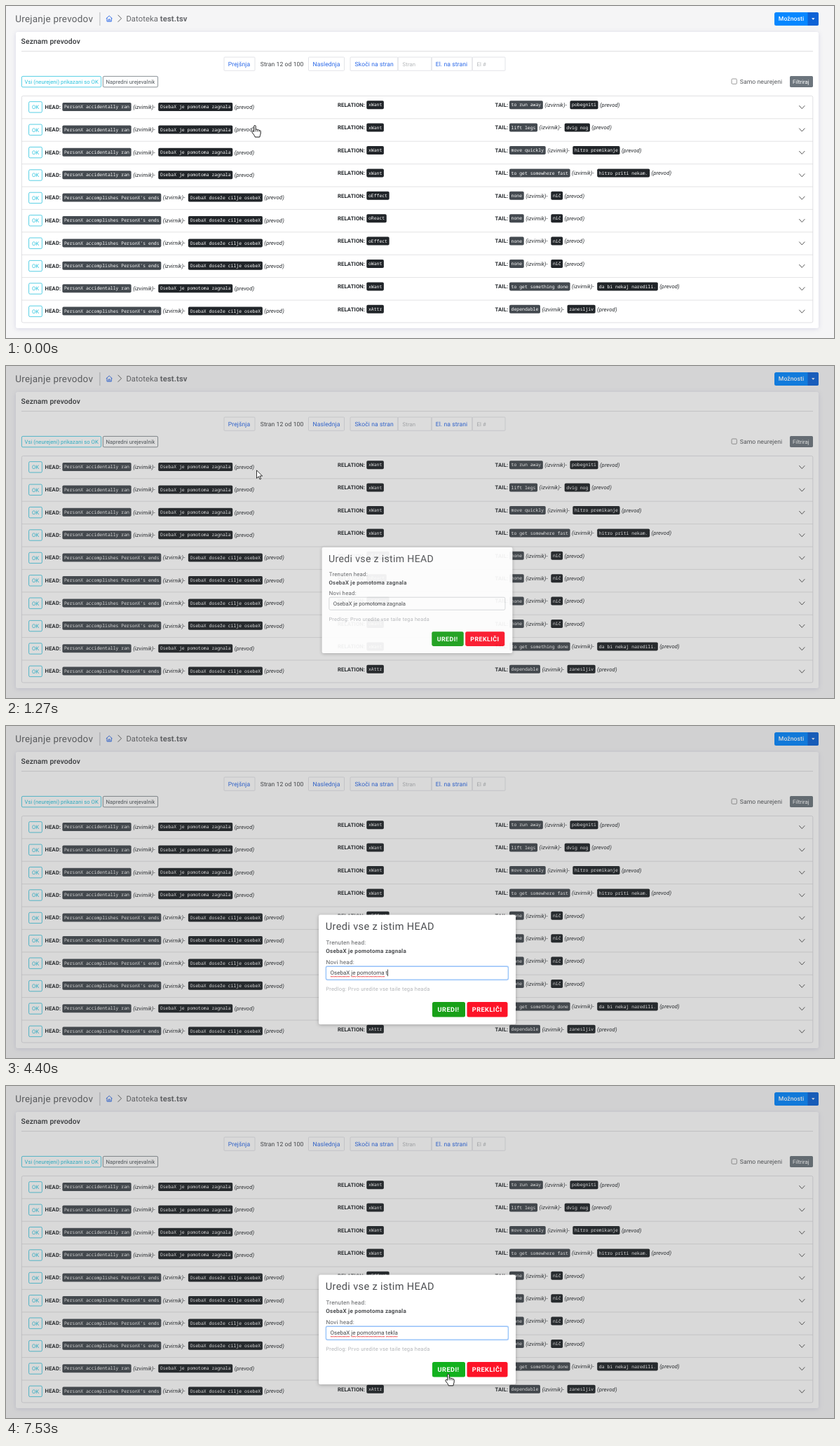
Write an HTML page that moves like this. It is 1181 px wide and 474 px high and loops after 8 s.

```html
<!DOCTYPE html>
<html lang="sl">
<head>
<meta charset="utf-8">
<title>Urejanje prevodov</title>
<style>
  html, body { margin: 0; width: 100%; height: 100%; overflow: hidden; background: #f5f5f6; }
  svg { display: block; width: 1181px; height: 474px; }
  text { font-family: Roboto, sans-serif; white-space: pre; text-rendering: geometricPrecision; }
  .code { font: 500 6.46px "Noto Sans Mono", monospace; fill: #fff; }
  .card { filter: drop-shadow(0 1px 3px rgba(60, 65, 150, .16)); }
  .box { filter: drop-shadow(0 1px 2.5px rgba(0, 0, 0, .25)); }
</style>
</head>
<body>
<svg id="stage" viewBox="0 0 1181 474"></svg>
<script>
const LOOP = 8000, CHAR = 3.877;
const BLUE = '#2a68e8', CYAN = '#2cc3dd', INK = '#24282c', GREY = '#6c757d';

const text = (x, y, s, size, fill, { w = 400, ls = .08, id = '' } = {}) =>
  `<text id="${id}" x="${x}" y="${y}" font-size="${size}" font-weight="${w}" letter-spacing="${ls}" fill="${fill}">${s}</text>`;
const rect = (x, y, w, h, fill, r = 0, extra = '') =>
  `<rect x="${x}" y="${y}" width="${w}" height="${h}" rx="${r}" fill="${fill}" ${extra}/>`;
const frame = (x, y, w, h, color, r = 1.7) =>
  rect(x, y, w, h, 'none', r, `stroke="${color}" stroke-width=".8"`);
const line = (d, color, width = .8) =>
  `<path d="${d}" fill="none" stroke="${color}" stroke-width="${width}"/>`;

const codeWidth = s => s.length * CHAR + 5.2;
const code = (x, y, s, fill) =>
  rect(x, y - 6, codeWidth(s), 12, fill, 1.8) + `<text class="code" x="${x + 2.6}" y="${y + 2.1}">${s}</text>`;

// A label followed by the English chip and its translation
function pair(x, y, from, to) {
  const a = x + codeWidth(from), b = a + 38.6;
  return code(x, y, from, '#444a50') +
    text(a + 2.5, y + 2.8, '<tspan font-style="italic">(izvirnik)</tspan>-', 7.75, INK) +
    code(b, y, to, '#212529') +
    text(b + codeWidth(to) + 2.4, y + 2.8, '<tspan font-style="italic">(prevod)</tspan>', 7.75, INK);
}

const RAN = ['PersonX accidentally ran', 'OsebaX je pomotoma zagnala'];
const ENDS = ["PersonX accomplishes PersonX's ends", 'OsebaX doseže cilje osebeX'];
const rows = [
  [RAN, 'xWant', 'to run away', 'pobegniti'],
  [RAN, 'xWant', 'lift legs', 'dvig nog'],
  [RAN, 'xWant', 'move quickly', 'hitro premikanje'],
  [RAN, 'xWant', 'to get somewhere fast', 'hitro priti nekam.'],
  [ENDS, 'oEffect', 'none', 'nič'],
  [ENDS, 'oReact', 'none', 'nič'],
  [ENDS, 'oEffect', 'none', 'nič'],
  [ENDS, 'oWant', 'none', 'nič'],
  [RAN, 'xWant', 'to get something done', 'da bi nekaj naredili.'],
  [ENDS, 'xAttr', 'dependable', 'zanesljiv'],
];

function row([head, relation, tail, tailTo], i) {
  const y = 144 + i * 32.4, up = y - 2.8, bold = { w: 700 };
  return (i ? line(`M22 ${y - 15.6}H1151`, '#dcdcde') : '') +
    frame(32.6, y - 7.4, 18.8, 15.4, CYAN) + text(37, y + 3.2, 'OK', 7.75, CYAN, { ls: 0 }) +
    text(55.6, y + 2.8, 'HEAD:', 7.75, INK, bold) + pair(80.4, y, ...head) +
    text(473, up + 2.8, 'RELATION:', 7.75, INK, bold) + code(514.3, up, relation, '#212529') +
    text(697.6, up + 2.8, 'TAIL:', 7.75, INK, bold) + pair(718, up, tail, tailTo) +
    line(`M1131.3 ${y - 1.8}l4 4.4l4-4.4`, '#444', .9);
}

const header =
  text(13.3, 23, 'Urejanje prevodov', 13.5, '#5e6063', { ls: .22 }) +
  line('M133.9 9V28', '#a9abb0') +
  line('M142.8 18L147.2 14L151.6 18M144 17V22H150.4V17M146.1 22V19H148.3V22', BLUE, .9) +
  line('M159.6 12.8L164.6 17.8L159.6 22.8', '#626262', 1) +
  text(171.4, 21.6, 'Datoteka <tspan font-weight="700">test.tsv</tspan>', 11.25, '#66686c') +
  rect(1096, 9, 63, 19, '#0587ff', 2.5) +
  '<path d="M1143.5 9H1156.5Q1159 9 1159 11.5V25.5Q1159 28 1156.5 28H1143.5Z" fill="#0d63d6"/>' +
  text(1101.8, 21.3, 'Možnosti', 8.61, '#fff', { w: 500 }) +
  '<path d="M1149 17.2H1153.6L1151.3 19.8Z" fill="#fff"/>';

const tools =
  rect(14, 37, 1145, 423, '#fff', 2.5, 'class="card"') +
  text(21.6, 53.8, 'Seznam prevodov', 10.4, '#333639', { w: 500, ls: .1 }) +
  line('M22 64.6H1151', '#d4d4d6') +
  [[311, 44], [431.5, 51], [491, 68], [559, 48], [607, 58], [665, 47]]
    .map(([x, w]) => frame(x, 73, w, 19.3, '#dcdee2', 1)).join('') +
  [[316.8, 'Prejšnja'], [437.5, 'Naslednja'], [497.6, 'Skoči na stran'], [612.7, 'El. na strani']]
    .map(([x, s]) => text(x, 86, s, 8.61, BLUE)).join('') +
  text(362.8, 86, 'Stran 12 od 100', 8.61, '#414448') +
  text(565.6, 85.7, 'Stran', 7.75, '#b4b7ba') + text(671.6, 85.7, 'El #', 7.75, '#b4b7ba') +
  frame(22.4, 100.4, 113.2, 15.4, CYAN) +
  text(26.6, 110.6, 'Vsi (neurejeni) prikazani so OK', 7.75, CYAN, { ls: 0 }) +
  frame(138.4, 100.4, 78.2, 15.4, GREY) +
  text(142.6, 110.6, 'Napredni urejevalnik', 7.75, '#50575d', { ls: 0 }) +
  frame(1035, 104, 7.3, 7.3, '#858585', 1.3) +
  text(1046.8, 110.8, 'Samo neurejeni', 8.61, '#54575b') +
  rect(1118, 100, 33, 16, GREY, 1.7) + text(1122, 110.6, 'Filtriraj', 7.75, '#fff', { ls: 0 }) +
  frame(22.4, 128.4, 1128.4, 323.6, '#d8d9dc', 2);

const dialog =
  rect(446, 269.5, 281, 156.5, '#fff', 2.5, 'class="box"') +
  text(455.8, 291.4, 'Uredi vse z istim HEAD', 14.6, '#4d4f52', { ls: .33 }) +
  text(456.5, 312, 'Trenuten head:', 8.1, '#5c5e61', { ls: .25 }) +
  text(456.2, 324.4, RAN[1], 8.1, '#4c4e51', { w: 700, ls: .25 }) +
  text(456.5, 340, 'Novi head:', 8.1, '#5c5e61', { ls: .25 }) +
  rect(455.6, 342.2, 261.6, 21, '#b5d4fb', 2.4, 'id="glow"') +
  rect(456.6, 343.4, 259.6, 18.6, '#fff', 2, 'id="field" stroke-width=".8"') +
  rect(541.4, 346.8, 28.2, 11.4, '#2b7cd3', 0, 'id="mark"') +
  text(462.6, 355.2, '', 8, '#444649', { ls: 0, id: 'value' }) +
  '<path id="wave" fill="none" stroke="#ee3038" stroke-width=".9"/>' +
  rect(558.8, 347.6, .8, 9.6, '#222', 0, 'id="caret"') +
  text(456.2, 378, 'Predlog: Prvo uredite vse taile tega heada', 7.5, '#b3b5b8', { ls: .25 }) +
  rect(608, 394, 47, 21.5, '#18a018', 2.5, 'id="ok"') +
  text(615.6, 408, 'UREDI!', 9.2, '#fff', { w: 700, ls: .45 }) +
  rect(657.5, 394, 58, 21.5, '#fd1327', 2.5) +
  text(664.8, 408, 'PREKLIČI', 9.2, '#fff', { w: 700, ls: .45 });

const pointers =
  '<g id="arrow"><path d="M0 0V11.4L2.7 8.9L4.6 13L6.2 12.2L4.4 8.2H8.1Z" fill="#fff" stroke="#000" stroke-width=".8"/></g>' +
  '<g id="hand"><path d="M-1.3 9V1C-1.3-.3 1.2-.3 1.2 1V6C2 5.3 3.6 5.4 3.7 6.5C4.6 5.9 6 6.2 6.1 7.2C7 6.8 8.2 7.2 8.2 8.3V11.5C8.2 13.5 7 14.5 6.8 16.6H.2C0 14.5-2.5 12.5-4 9.8C-4.6 8.6-3 7.6-2.2 8.3Z" fill="#fff" stroke="#000" stroke-width=".9"/><path d="M1.2 6V9M3.7 6.6V9M6.1 7.3V9.2" stroke="#000" stroke-width=".7"/></g>' +
  '<g id="beam"><path d="M-2.2-5.6H-.8L0-5L.8-5.6H2.2M0-5V5M-2.2 5.6H-.8L0 5L.8 5.6H2.2" fill="none" stroke-width=".9"/></g>';

document.getElementById('stage').innerHTML =
  rect(0, 0, 1181, 474, '#f5f5f6') + header + tools + rows.map(row).join('') +
  rect(0, 0, 1181, 474, '#444', 0, 'id="shade"') + `<g id="dialog">${dialog}</g>` + pointers;

const $ = id => document.getElementById(id);
const set = (id, name, v) => $(id).setAttribute(name, v);
const show = (id, on) => set(id, 'visibility', on ? 'visible' : 'hidden');

// cubic-bezier(.36, .55, .19, 1)
function ease(x) {
  const at = (s, a, b) => 3 * (1 - s) ** 2 * s * a + 3 * (1 - s) * s * s * b + s ** 3;
  let lo = 0, hi = 1;
  for (let i = 0; i < 20; i++) {
    const mid = (lo + hi) / 2;
    if (at(mid, .36, .19) < x) lo = mid; else hi = mid;
  }
  return at(lo, .55, 1);
}

// Pointer stops: time, x, y
const path = [
  [0, 355, 170.5], [35, 355, 170.5], [270, 348.5, 144], [930, 348.5, 144], [1130, 348.5, 143.2],
  [1270, 357, 148.4], [1730, 592.5, 366.4], [2130, 543, 352.2], [5420, 543, 352.2], [5530, 531.8, 352.5],
  [5700, 531.8, 352.5], [6530, 581, 369.5], [6600, 583, 371], [7000, 631.6, 411.2],
  [7240, 631.6, 411.2], [7270, 631, 411.2], [LOOP, 631, 411.2],
];
function pointerAt(t) {
  const i = path.findIndex(p => p[0] > t), [t0, x0, y0] = path[i - 1], [t1, x1, y1] = path[i];
  const k = (t - t0) / (t1 - t0);
  return [x0 + (x1 - x0) * k, y0 + (y1 - y0) * k];
}

const keys = [4400, 4470, 4600, 4800, 4870];
const stem = 'OsebaX je pomotoma ';
const wordEnds = [[462.8, 490.2], [492.4, 498.6], [500.6, 539.6]];
const wave = ([a, b]) => {
  let d = `M${a} 357.4`;
  for (let x = a, k = 1; x < b; x += 1.2, k = -k) d += `l1.2 ${.8 * k}`;
  return d;
};

function draw(t) {
  const p = ease(Math.min(1, Math.max(0, (t - 1015) / 440))), rest = 1 - p;
  set('shade', 'opacity', .2 * p);
  set('dialog', 'opacity', p);
  set('dialog', 'transform', `translate(586.5 ${347.7 - 203 * rest}) scale(${1 - .5 * rest}) translate(-586.5 -347.7)`);

  const focus = t >= 2200, marked = t >= 2470 && t < 4400, typed = keys.filter(k => k <= t).length;
  set('glow', 'opacity', focus ? Math.min(1, (t - 2130) / 200) : 0);
  set('field', 'stroke', focus ? '#80b7f8' : '#c9cbce');
  set('mark', 'opacity', marked ? 1 : 0);
  const last = typed ? 'tekla'.slice(0, typed) : 'zagnala';
  const value = stem + `<tspan fill="${marked ? '#fff' : '#444649'}">${last}</tspan>`;
  if ($('value').innerHTML !== value) $('value').innerHTML = value;

  const words = [...wordEnds];
  if (!typed) words.push([541.8, 569]);
  else if (t >= 5730) words.push([541.8, 558.6]);
  set('wave', 'd', focus ? words.map(wave).join('') : '');

  // The caret stays on while typing, then blinks
  const widths = [0, 2.6, 6.9, 10.9, 12.9, 17.2];
  const caretOn = typed && Math.floor((t - keys[typed - 1]) / 530) % 2 === 0;
  set('caret', 'x', 541.6 + widths[typed]);
  set('caret', 'opacity', caretOn ? 1 : 0);

  const [x, y] = pointerAt(t);
  const overOk = t > 6500 && x > 608 && y > 394;
  const overField = t > 1730 && y < 362.5;
  const kind = t < 1000 || overOk ? 'hand' : overField ? 'beam' : 'arrow';
  const hidden = t >= 4400 && t < 5400;
  for (const id of ['arrow', 'hand', 'beam']) {
    show(id, id === kind && !hidden);
    set(id, 'transform', `translate(${x} ${y})`);
  }
  set('beam', 'stroke', marked ? '#d8e8fa' : '#222');
  set('ok', 'fill', overOk ? '#12b11e' : '#18a018');
}

const start = performance.now();
function tick() {
  draw((performance.now() - start) % LOOP);
  requestAnimationFrame(tick);
}
tick();
</script>
</body>
</html>
```
